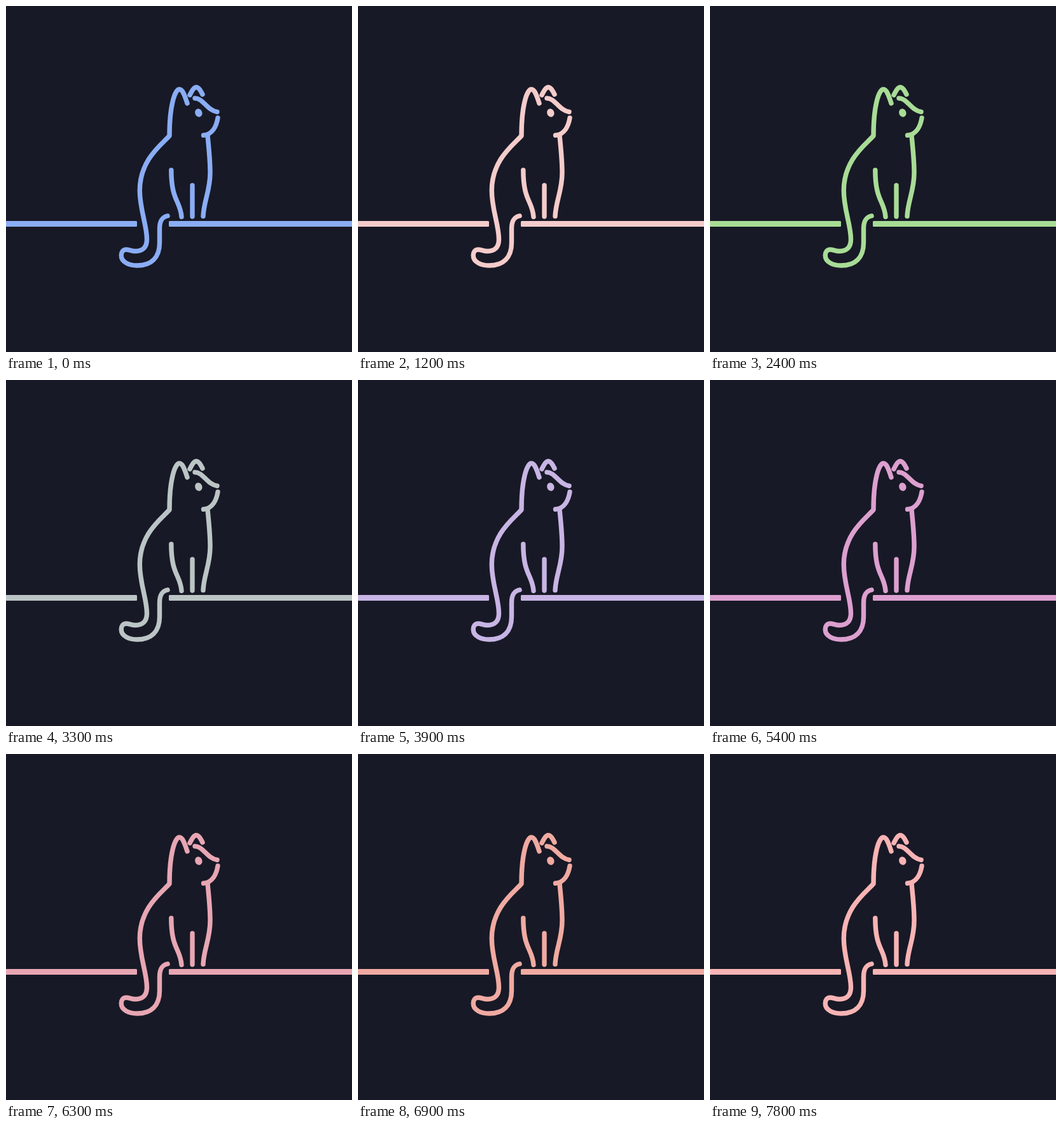
These frames come from a looping animation (544x544 px, 8 s). An HTML page:

```html
<!DOCTYPE html>
<html lang="en">
<head>
<meta charset="utf-8">
<title>Cat on a line</title>
<style>
html, body { margin: 0; width: 100%; height: 100%; overflow: hidden; background: #181926; }
svg { display: block; width: 100%; height: 100%; color: #8aadf4; }
.cat { fill: none; stroke: currentColor; stroke-width: 7.4; stroke-linecap: round; stroke-linejoin: round; }
.solid { fill: currentColor; }
</style>
</head>
<body>
<svg id="scene" viewBox="0 0 544 544">
  <g class="solid">
    <rect x="-4" y="338" width="210" height="9" rx="1.5"/>
    <rect x="256" y="338" width="292" height="9" rx="1.5"/>
    <ellipse cx="302.8" cy="168" rx="5.6" ry="6.7" transform="rotate(-20 302.8 168)"/>
  </g>
  <g class="cat">
    <!-- ear, back and tail -->
    <path d="M285 153C281 141 278 131 272.500 131C266 131 257 155 257 204C246 217 210.300 241 210.300 290C210.300 320 221.500 344 221.500 367C221.500 380 214 385.500 204 385.500C197 385.500 194 383 189 383C184 383 181.200 387 181.200 392C181.200 403 194 408 206 408C228 408 241.500 396 241.500 372V350C241.500 338 245 332 254 330"/>
    <!-- far ear -->
    <path d="M289 140C293 132 296 127.700 299 127.700C303 127.700 306 133 309 139"/>
    <!-- face -->
    <path d="M297 145C310 145 316 164 332 166.500"/>
    <path d="M333 176C331 188 325 202 310.500 203.300"/>
    <!-- chest and legs -->
    <path d="M317 204C319 225 321 242 321 262C321 291 311 306 310 330.500"/>
    <path d="M259.800 258C259.800 306 274 306 276 331.500"/>
    <path d="M293 282V331"/>
  </g>
</svg>
<script>
const DURATION = 8000, STEP = 300;
// [time in ms, colour]
const stops = [
  [0, '#8aadf4'],
  [1200, '#f4cccb'],
  [2400, '#a8dc96'],
  [3900, '#c8b5e4'],
  [5400, '#dca0cf'],
  [6900, '#f0aaa1'],
  [7800, '#f8b4b4'],
  [DURATION, '#f8b4b4']
];
const frames = stops.map(([time, color], i) => {
  const next = stops[i + 1] ? stops[i + 1][0] : time + STEP;
  const count = Math.max(1, Math.round((next - time) / STEP));
  return { offset: time / DURATION, color, easing: `steps(${count}, end)` };
});
document.getElementById('scene').animate(frames, { duration: DURATION, iterations: Infinity });
</script>
</body>
</html>
```
